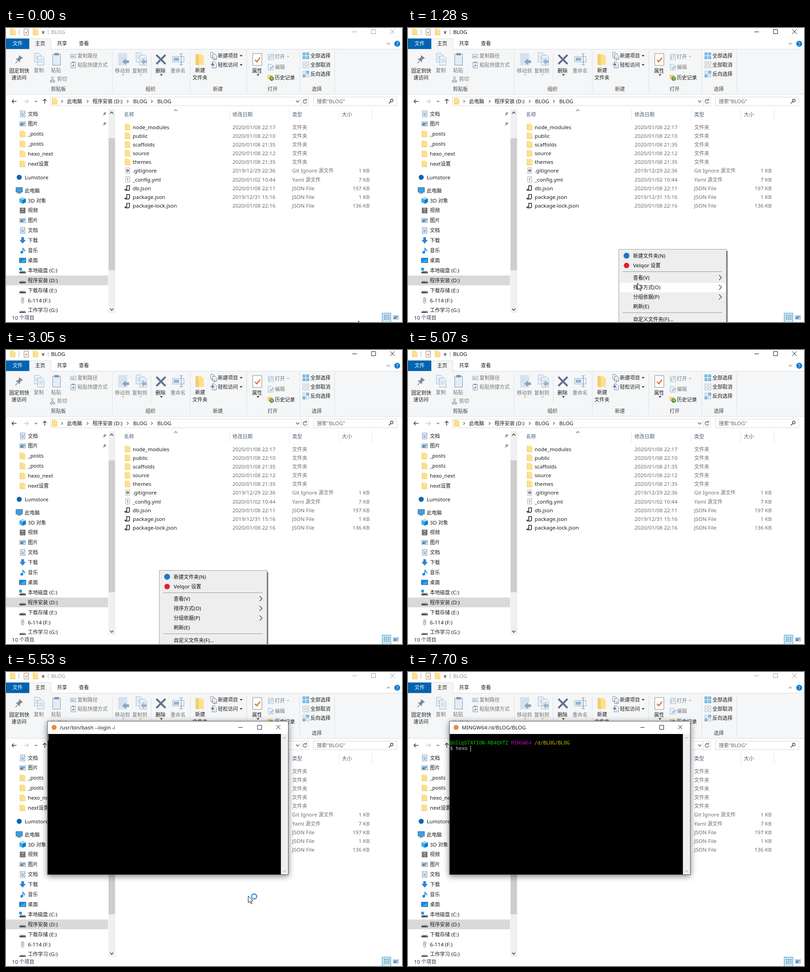
Animation, 869 px wide and 645 px high, one loop 8 s. Source, as an HTML page:

```html
<!DOCTYPE html>
<html lang="zh">
<head>
<meta charset="utf-8">
<title>Explorer and terminal</title>
<style>
html, body { margin: 0; width: 869px; height: 645px; overflow: hidden; background: #fff; }
svg { display: block; }
text { font: 11.6px "Noto Sans", "Noto Sans CJK SC", "Noto Sans CJK", sans-serif; white-space: pre; }
.cjk { font-size: 11px; font-family: "Noto Sans CJK SC", "Noto Sans CJK", sans-serif; }
.term { font: 10.66px "DejaVu Sans Mono", monospace; }
.comp { font: bold 22px "Noto Sans Mono", monospace; }
.num { font: 22px "Liberation Serif", serif; }
.cand { font: 300 22px "Noto Sans CJK SC", "Noto Sans CJK", sans-serif; }
#term { filter: drop-shadow(0 3px 7px rgba(0,0,0,.5)); }
</style>
</head>
<body>
<svg id="stage" width="869" height="645" viewBox="0 0 869 645"></svg>
<script>
const LOOP = 8000, FRAME = 1000 / 13;
const DARK = '#1c1c1c', DIM = '#777', BLUE = '#2b8dd6';

// Drawing helpers: each returns SVG markup.
const rect = (x, y, w, h, fill, stroke = 'none', more = '') =>
  `<rect x="${x}" y="${y}" width="${w}" height="${h}" fill="${fill}" stroke="${stroke}" ${more}/>`;
const line = (d, stroke = DARK, w = 1, fill = 'none') =>
  `<path d="${d}" stroke="${stroke}" stroke-width="${w}" fill="${fill}"/>`;
const fill = (d, color) => `<path d="${d}" fill="${color}"/>`;
const dot = (x, y, r, color, stroke = 'none', w = 1) =>
  `<circle cx="${x}" cy="${y}" r="${r}" fill="${color}" stroke="${stroke}" stroke-width="${w}"/>`;
const text = (x, cy, s, color = DARK, anchor = 'start') =>
  `<text x="${x}" y="${cy + 4}" fill="${color}" text-anchor="${anchor}">` +
  s.replace(/[\u2e80-\uffff]+/g, m => `<tspan class="cjk">${m}</tspan>`) + '</text>';
const styled = (cls, x, y, s, color) => `<text class="${cls}" x="${x}" y="${y}" fill="${color}">${s}</text>`;
const timed = (from, to, s) => `<g data-from="${from}" data-to="${to}">${s}</g>`;
const chevron = (x, y, w, h, color = '#555', k = 1.2) => line(`M${x - w} ${y - h}L${x} ${y + h}L${x + w} ${y - h}`, color, k);
const crumb = x => line(`M${x - 1.5} 158l3 3-3 3`, '#555', 1.1);
const caretDown = (x, y, color = DARK) => fill(`M${x - 3} ${y - 1.5}h6l-3 3.2z`, color);
const caption = (x, y, color, k = 5) =>
  line(`M${x - 46} ${y + .5}h${2 * k}M${x - 4} ${y - k + .5}h9v9h-9zM${x + 37} ${y - k}l${2 * k} ${2 * k}m0 ${-2 * k}l${-2 * k} ${2 * k}`, color);

// Icons, centred on the origin.
const icon = {
  folder: fill('M-6 -7h8.5l1 2h2.5v12h-12z', '#fde08c') + fill('M-6 -7h1v14h-1zM-6 6h12v1h-12z', '#ecc665'),
  doc: rect(-5, -6.5, 10, 13, '#fff', '#7b8fa5') + line('M-3 -3h3M-3 0h6M-3 3h6M2 -3h2', '#3d8ccc', 1.4),
  pic: rect(-6.5, -4.5, 13, 9, '#fff', '#8293a5') + fill('M-5 -3h10v4l-4-1-3 1-3-2z', '#4da0dc') + fill('M-5 3v-3l5 1 5 2z', '#365f78'),
  pin: `<g transform="rotate(40)">${fill('M-3 -5h6v1l-1 1v3l2 2h-8l2-2v-3l-1-1z', '#808a94')}${line('M0 2v5', '#808a94')}</g>`,
  pc: rect(-7, -6, 14, 10, '#3aa0e8', '#37607f') + line('M-4 6h8', '#37607f', 1.6),
  cube: fill('M-7 -4L0 -7 7 -4V4L0 7-7 4z', '#35b0e5') + fill('M0 -1L7 -4V4L0 7z', '#1379bd') + fill('M-5 -4L0 -6 5 -4 0 -2z', '#a5e4f8'),
  film: rect(-6, -6, 12, 12, '#444') + rect(-3, -5, 6, 4.5, '#7fb4d8') + rect(-3, .5, 6, 4.5, '#b88a66') +
    rect(-5, -5, 1, 10, '#aaa') + rect(4, -5, 1, 10, '#aaa'),
  down: fill('M-3 -7h6v6h4l-7 8-7-8h4z', '#2c85d4'),
  note: dot(-2, 4, 3, '#1e88e5') + line('M.5 4V-6q0 3 4 5v3', '#1e88e5', 1.8),
  desk: rect(-7, -5, 14, 10, '#148be0', '#1b5f96') + fill('M-6 4L6 -4V4z', '#39a9f0'),
  disk: fill('M-5 1h10l2 3h-14z', '#aaa') + rect(-7, 3, 14, 3.5, '#4b4b4b') + rect(3, 4, 2, 1, '#7fe07f'),
  usb: rect(-2.5, -6, 5, 12, '#eee', '#888', 'rx="2"') + line('M0 -4V2', '#888'),
  gear: rect(-4.5, -6, 9, 12, '#fafafa', '#aaa') + dot(0, 0, 2, 'none', '#555', 1.6),
  yml: rect(-4.5, -6, 9, 12, '#fafafa', '#aaa') + line('M0 -3V1M0 2v1.5', '#666', 1.4),
  json: line('M-3 -5h8M-2 -5V4M4 -5V2q0 3-3 3h-5q-2 0-2-2h4', '#3c3c3c', 1.8),
  check: rect(-5, -6.5, 10, 13, '#fff', '#888', 'vector-effect="non-scaling-stroke"') + line('M-2.5 .5l2 2 3.5-4.5', '#e0763a', 1.4)
};
const put = (name, x, y, k = 1) => `<g transform="translate(${x} ${y}) scale(${k})">${icon[name]}</g>`;
const page = (x, y, w, h, c = '#eaf2fa', s = '#9fb6cd') =>
  line(`M${x} ${y}h${w - 4}l4 4v${h - 4}h${-w}z`, s, 1, c) + line(`M${x + 3} ${y + 7}h${w - 6}m0 3h${6 - w}m0 3h${w - 6}`, s, .8);

function titleBar() {
  const state = c => caption(806, 8, c) + text(99, 8.5, 'BLOG', c);
  return put('folder', 15, 8.5) + put('check', 44.5, 9) + put('folder', 65, 8.5) +
    line('M28.5 3v12M92.5 3v12', '#aaa') + line('M78.5 7.5h6') + caretDown(81.5, 11) +
    timed(745, 5380, state('#111')) + timed(0, 745, state('#999')) + timed(5380, LOOP, state('#999'));
}

function ribbon() {
  let s = rect(0, 46, 869, 100, '#f5f6f7') + line('M0 46.5H869M0 145.5H869', '#dadbdc') +
    rect(51.5, 23.5, 47, 24, '#f5f6f7', '#dadbdc') + rect(52, 46, 46, 3, '#f5f6f7') +
    rect(0, 23, 51, 23, '#0063b1') + text(25.5, 34, '文件', '#fff', 'middle') +
    text(64, 34, '主页') + text(112, 34, '共享') + text(160, 34, '查看') +
    chevron(839, 34.5, 3.5, -1.8, '#888') + dot(858.5, 34.5, 6.5, '#0a78d0') + text(858.5, 34.5, '?', '#fff', 'middle');
  for (const x of [233, 404, 528, 644, 721]) s += line(`M${x + .5} 49v93`, '#e0e1e2');
  s += line('M318.5 56v60', '#e0e1e2');
  for (const [x, n] of [[115, '剪贴板'], [317, '组织'], [465, '新建'], [585, '打开'], [682, '选择']])
    s += text(x, 134, n, '#444', 'middle');
  for (const [x, y, n, c] of [
    [7, 94, '固定到快', DARK], [12, 109, '速访问', DARK], [61, 93, '复制', DIM], [99, 93, '粘贴', DIM],
    [112, 112, '剪切', DIM], [157, 61, '复制路径', DIM], [157, 81, '粘贴快捷方式', DIM],
    [239, 94, '移动到', DIM], [277, 94, '复制到', DIM], [328, 94, '删除', DARK], [361, 94, '重命名', DIM],
    [415, 93, '新建', DARK], [409, 109, '文件夹', DARK], [465, 60.5, '新建项目', DARK], [465, 80.5, '轻松访问', DARK],
    [540, 94, '属性', DARK], [590, 63, '打开', DIM], [590, 86, '编辑', DIM], [590, 109, '历史记录', DARK],
    [668, 61, '全部选择', DARK], [668, 81, '全部取消', DARK], [668, 101, '反向选择', DARK]]) s += text(x, y, n, c);
  for (const [x, y, c] of [[257, 103, '#bbb'], [295, 103, '#bbb'], [341, 103], [516, 61], [516, 81], [553, 103], [619, 63, '#bbb']])
    s += caretDown(x, y, c);
  // Clipboard group
  s += put('pin', 28, 69, 1.6) + page(62.5, 55.5, 14, 19) + page(69.5, 61.5, 14, 20) +
    rect(102.5, 57.5, 17, 24, '#e3edf7', '#8196ad') + rect(106, 55, 10, 5, '#8196ad') +
    line('M99 106l6 9M105 106l-6 9', '#8a98a8', 1.3) + dot(99, 117, 2, 'none', '#8a98a8', 1.3) + dot(105, 117, 2, 'none', '#8a98a8', 1.3) +
    rect(141.5, 57.5, 12, 8, '#dfe8f2', '#9eb2c8') + line('M143 62l2 1 1-2 2 2 2-1', '#5b7ea5') +
    rect(142.5, 75.5, 10, 12, '#f3f7fb', '#8196ad') + rect(145, 74, 5, 3, '#8196ad') + line('M145 85l4-4m-3 0h3v3', '#4d7fb5', 1.2);
  // Organise group
  s += rect(246, 55, 20, 27, '#d5e3f0') + fill('M270 71h-7v-4l-8 7 8 7v-4h7z', '#8ca5bf') +
    page(285.5, 54.5, 14, 20) + page(293.5, 59.5, 15, 22) + fill('M309 71h-6v-4l-7 7 7 7v-4h6z', '#9db3c9') +
    line('M330 59l20 20M350 59l-20 20', '#60708f', 4) +
    rect(365.5, 62.5, 25, 12, '#f4f8fc', '#92a8bf') + rect(368, 65, 12, 7, '#8fb5d9') + line('M381 56.5h7M381 80.5h7M384.5 57v23', '#7890a8', 1.2);
  // New group
  s += fill('M416 57h12l2 3h4v21h-18z', '#fde08c') + fill('M416 57h3l4 4v22l-7-3z', '#f3cd6c') +
    page(449.5, 53.5, 9, 11, '#fff', '#778') + page(453.5, 57.5, 9, 11, '#eaf4ff', '#778') +
    page(452.5, 74.5, 9, 13, '#fff', '#778') + line('M449 80h7m-3-3l3 3-3 3', '#2b7cc8', 1.6);
  // Open group
  s += put('check', 551.5, 69, 2) + rect(575.5, 57.5, 12, 12, '#eef3f8', '#a9bccf') + line('M578 60v8M581 60h5M581 64h5', '#9eb6d0', 1.6) +
    page(575.5, 79.5, 11, 13) + line('M580 90l7-7', '#9eb6d0', 2) +
    rect(574, 103, 11, 9, '#f3cf6a') + dot(583, 111, 4.5, '#6ba544', '#3e7b2e') + line('M583 108v3h2', '#fff');
  // Select group: all, none, inverted
  const picked = [() => true, () => false, k => k == 1 || k == 2];
  picked.forEach((on, i) => {
    for (let k = 0; k < 4; k++)
      s += rect(651.5 + (k % 2) * 8, 54.5 + i * 20 + (k >> 1) * 8, 5, 5, on(k) ? '#9ad2f5' : '#fff', on(k) ? BLUE : '#a5b2bf');
  });
  return s;
}

function addressBar() {
  return line('M23 161H13m4-4l-4 4 4 4M85 166v-10m-4 4l4-4 4 4', '#444', 1.5) + line('M39 161h10m-4-4l4 4-4 4', '#ccc', 1.5) +
    chevron(66, 161, 2.5, 1.2) + rect(97.5, 151.5, 566, 19, '#fff', '#d9d9d9') + line('M647.5 152v18', '#d9d9d9') +
    put('folder', 107, 160.5) + [123, 179, 267, 320].map(crumb).join('') +
    text(134, 161, '此电脑') + text(190, 161, '程序安装 (D:)') + text(279, 161, 'BLOG') + text(332, 161, 'BLOG') +
    chevron(640, 161, 3.5, 2) + line('M659 158.5a4 4 0 1 0 1 3M656 158.5h3.5v-3.5', '#555', 1.2) +
    rect(674.5, 151.5, 183, 19, '#fff', '#d9d9d9') + text(682, 161, '搜索"BLOG"', '#666') +
    dot(846.5, 159, 3, 'none', '#444', 1.3) + line('M844 161.5l-4 4', '#444', 1.6);
}

function sidebar() {
  let s = rect(0, 543, 224, 21.5, '#d9d9d9');
  const rows = [['doc', '文档'], ['pic', '图片'], ['folder', '_posts'], ['folder', '_posts'], ['folder', 'hexo_next'], ['folder', 'next设置']];
  const drives = [['cube', '3D 对象'], ['film', '视频'], ['pic', '图片'], ['doc', '文档'], ['down', '下载'], ['note', '音乐'], ['desk', '桌面'],
    ['disk', '本地磁盘 (C:)'], ['disk', '程序安装 (D:)'], ['disk', '下载存储 (E:)'], ['usb', '6-114 (F:)'], ['disk', '工作学习 (G:)']];
  const list = (items, y) => items.forEach(([i, n], k) => {
    const cy = y + k * 21.9;
    s += put(i, 36.5, cy) + text(48, cy, n);
  });
  list(rows, 188.5);
  list(drives, 378.5);
  s += put('pin', 216, 188.5, .8) + put('pin', 216, 210.5, .8) + dot(29, 327.5, 5.5, '#0a64b4') + text(41, 327.5, 'Lumstore') +
    put('pc', 29, 356) + text(41, 356.5, '此电脑') + rect(29, 526, 6, 6, '#1e9be8') +
    rect(0, 625, 240, 20, '#fff') + rect(225, 178, 15, 447, '#f0f0f0') + rect(225, 242, 14, 289.5, '#cdcdcd') +
    chevron(232, 186, 3.5, -2, '#444', 1.5) + chevron(232, 617.5, 3.5, 2, '#444', 1.5) + text(13, 635.5, '10 个项目', '#26364d');
  return s + rect(825.5, 625.5, 19, 21, '#cce8f6', '#26a0da') +
    line('M829 630.5h4m1 0h3m1 0h4M829 634.5h4m1 0h3m1 0h4M829 638.5h4m1 0h3m1 0h4', '#5d7f99', 1.6) + put('pic', 855.5, 635, .9);
}

function fileList() {
  let s = chevron(372.5, 180.5, 3.5, -1.8, '#666');
  for (const x of [491, 622, 731, 804]) s += line(`M${x - .5} 178v26`, '#e5e5e5');
  [[259, '名称'], [497, '修改日期'], [628, '类型'], [737, '大小']].forEach(([x, n]) => s += text(x, 190, n, '#4c607a'));
  [['folder', 'node_modules', '2020/01/08 22:17', '文件夹'], ['folder', 'public', '2020/01/08 22:10', '文件夹'],
   ['folder', 'scaffolds', '2020/01/08 21:35', '文件夹'], ['folder', 'source', '2020/01/08 22:12', '文件夹'],
   ['folder', 'themes', '2020/01/08 21:35', '文件夹'], ['gear', '.gitignore', '2019/12/29 22:36', 'Git Ignore 源文件', 1],
   ['yml', '_config.yml', '2020/01/02 10:44', 'Yaml 源文件', 7], ['json', 'db.json', '2020/01/08 22:11', 'JSON File', 197],
   ['json', 'package.json', '2019/12/31 15:16', 'JSON File', 1], ['json', 'package-lock.json', '2020/01/08 22:16', 'JSON File', 136]
  ].forEach(([i, name, date, type, size], k) => {
    const y = 217.5 + k * 19.17;
    s += put(i, 267, y - .5) + text(278, y, name) + text(497, y, date, '#6d6d6d') + text(628, y, type, '#6d6d6d') +
      (size ? text(798, y, size + ' KB', '#6d6d6d', 'end') : '');
  });
  return s;
}

const MENU = [[14.5, '新建文件夹(N)'], [35.5, 'Velqor 设置'], [62.5, '查看(V)', 1], [84, '排序方式(O)', 1],
  [105, '分组依据(P)', 1], [126, '刷新(E)'], [153.5, '自定义文件夹(F)...']];
function menu() {
  const items = MENU.map(([y, n, sub]) => text(32, y, n, '#111') + (sub ? line(`M220.5 ${y - 5.5}l5.5 5.5-5.5 5.5`, '#333', 1.1) : '')).join('');
  const shadow = [1, 2, 3].map(d => rect(4, 4, 233 + d, 180, 'rgba(0,0,0,.26)')).join('');
  return shadow + rect(.5, .5, 236, 180, '#eee', '#a0a0a0') +
    rect(3, 0, 232, 21, '#fff', 'none', 'id="hover"') +
    `<g id="items">${items}${line('M9 49.5h218M9 139.5h218', '#999')}${dot(17.5, 14.5, 6.5, '#1a78c8')}${dot(17.5, 36, 6, '#e0202c')}</g>`;
}

function terminal() {
  const caret = (x, y) => line(`M${x + .5} ${y}v13`, '#ddd');
  const prompt = styled('term', 91.5, 158.5, '<tspan fill="#0cc20c">QUIL@STATION-RB4QXTZ</tspan> <tspan fill="#c000c0">MINGW64</tspan> <tspan fill="#c4c400">/d/BLOG/BLOG</tspan>', '#ccc') +
    styled('term', 92, 171, '$', '#ccc');
  return rect(91, 108, 528.5, 336.5, '#fff', '#555') + rect(91.5, 136, 512, 308, '#000') + rect(603.5, 136, 15.5, 308, '#f0f0f0') +
    chevron(611, 144.5, 3, -1.6, '#aaa') + chevron(611, 437, 3, 1.6, '#aaa') + dot(105.5, 121.5, 5.5, '#ee8a3c') + caption(556, 121, '#111', 4.5) +
    timed(0, 5840, text(118, 122, '/usr/bin/bash --login -i') + caret(92, 137)) +
    timed(5840, LOOP, text(118, 122, 'MINGW64:/d/BLOG/BLOG') + prompt) +
    timed(5840, 6390, caret(105, 162)) + timed(6920, 7470, caret(105, 162)) +
    timed(7470, LOOP, styled('term', 104.8, 171, 'hexo', '#ccc')) + timed(7550, 7700, caret(130, 162)) + timed(7700, LOOP, caret(137, 162));
}

const okHand = line('M384 240q-2-5-3-7M388 239q0-5 0-8M392 240q2-4 2-8', '#fbc234', 3) +
  dot(386, 244, 4, 'none', '#fbc234', 3) + fill('M388 238l8 0q2 8-4 12h-6z', '#f5b022');
function ime(from, to, typed, right, words) {
  const mid = (98 + right) / 2 + 1.5, teal = '#5fc9d6', end = 130 + 13.2 * (typed.length - 1);
  let x = 117;
  const list = words.split(' ').map((w, i) => {
    const c = i ? teal : '#f0e326';
    const s = styled('num', x, 249, i + 1 + '.', c) + (w == '*' ? okHand : styled('cand', x + 21.5, 249, w, c));
    x += 36.3 + 22 * w.length;
    return s;
  }).join('');
  return timed(from, to, rect(98, 188, right - 98, 80, '#272822', 'none', 'rx="6"') + styled('comp', 116, 216, typed, '#fff') +
    line(`M${end} 196v25`, '#e0443c', 1.4) + dot(mid, 208.5, 4.5, 'none', teal) + line(`M${mid - 2.5} 208.5h5M${mid} 206v5`, teal) + list +
    line(`M${right - 38} 237l-4 4 4 4`, '#4a8f98', 1.6) + line(`M${right - 32} 237l4 4-4 4`, teal, 1.8));
}

const stage = document.getElementById('stage');
stage.innerHTML = rect(0, 0, 869, 645, '#fff') + titleBar() + ribbon() + addressBar() + sidebar() + fileList() +
  `<g id="menu">${menu()}</g>` + timed(5380, LOOP, `<g id="term">${terminal()}</g>`) +
  ime(6920, 7000, 'h', 468, '和 会 后 还 *') + ime(7000, 7150, 'he', 468, '和 河 喝 合 何') +
  ime(7150, 7320, 'hex', 551, '和谐 核心 很想 海鲜 和') + ime(7320, 7470, 'hexo', 631, '和谐哦 很想哦 和小 很小哦 喝') +
  `<g id="arrow">${line('M0 0V14.5L3.4 11.4 6 17.3 8.3 16.3 5.8 10.6H10.5z', '#111', 1, '#fff')}<g id="busy">${dot(13, 1, 5.5, '#fff', '#4c9be8', 3)}</g></g>` +
  `<g id="beam">${line('M-3 -6.5q3 0 3 2V4.5q0 2-3 2M3 -6.5q-3 0-3 2M3 6.5q-3 0-3-2M-1.5 3.5h3', '#e8e8e8', 1.1)}</g>`;

// Pointer path: time, x, y.
const PATH = [[0, 773, 642], [70, 769, 636], [300, 680, 580], [560, 520, 505], [740, 462, 486], [970, 462, 486], [1130, 476, 515],
  [1280, 503, 560], [1430, 517, 590], [1600, 516, 608], [1750, 500, 602], [1880, 500, 602], [2050, 410, 548], [2250, 345, 490],
  [2400, 326, 473], [2600, 337, 484], [2810, 337, 484], [3040, 385, 652], [5270, 518, 652], [5305, 518, 594], [5380, 524, 550],
  [5460, 534, 502], [5530, 530, 486], [5620, 495, 430], [5760, 425, 345], [5910, 406, 329], [LOOP, 406, 329]];
function pointer(t) {
  const i = Math.max(1, PATH.findIndex(p => p[0] >= t)), [a, x, y] = PATH[i - 1], [b, u, v] = PATH[i];
  const k = (t - a) / (b - a);
  return [Math.round(x + (u - x) * k), Math.round(y + (v - y) * k)];
}

const $ = id => document.getElementById(id);
const show = (el, on) => { el.style.display = on ? '' : 'none'; };
const parts = [...stage.querySelectorAll('[data-from]')].map(el => [el, +el.dataset.from, +el.dataset.to]);
const between = (t, a, b) => t >= a && t < b;

function draw(t) {
  for (const [el, a, b] of parts) show(el, between(t, a, b));

  const [x, y] = pointer(Math.max(0, Math.floor((t + 30) / FRAME) * FRAME - 30));
  const overTerm = t >= 5380 && y < 444;
  show($('arrow'), !overTerm && y < 645);
  show($('busy'), t >= 5300);
  show($('beam'), overTerm && t < 7700);
  $('arrow').setAttribute('transform', `translate(${x + .5} ${y + .5})`);
  $('beam').setAttribute('transform', `translate(${x} ${y})`);

  const first = t < 2670, mx = first ? 462 : 336, my = first ? 485 : 483;
  show($('menu'), between(t, 820, 2590) || between(t, 2740, 5070));
  show($('items'), first ? t >= 900 : t >= 2820);
  $('menu').setAttribute('transform', `translate(${mx} ${my})`);
  const row = x > mx + 2 && x < mx + 235 && y > my + 4 && MENU.find(([c]) => Math.abs(y - my - c) < 10.5);
  show($('hover'), row);
  if (row) $('hover').setAttribute('y', Math.round(row[0]) - 10);
}
const start = performance.now();
function tick() {
  draw((performance.now() - start) % LOOP);
  requestAnimationFrame(tick);
}
tick();
</script>
</body>
</html>
```
